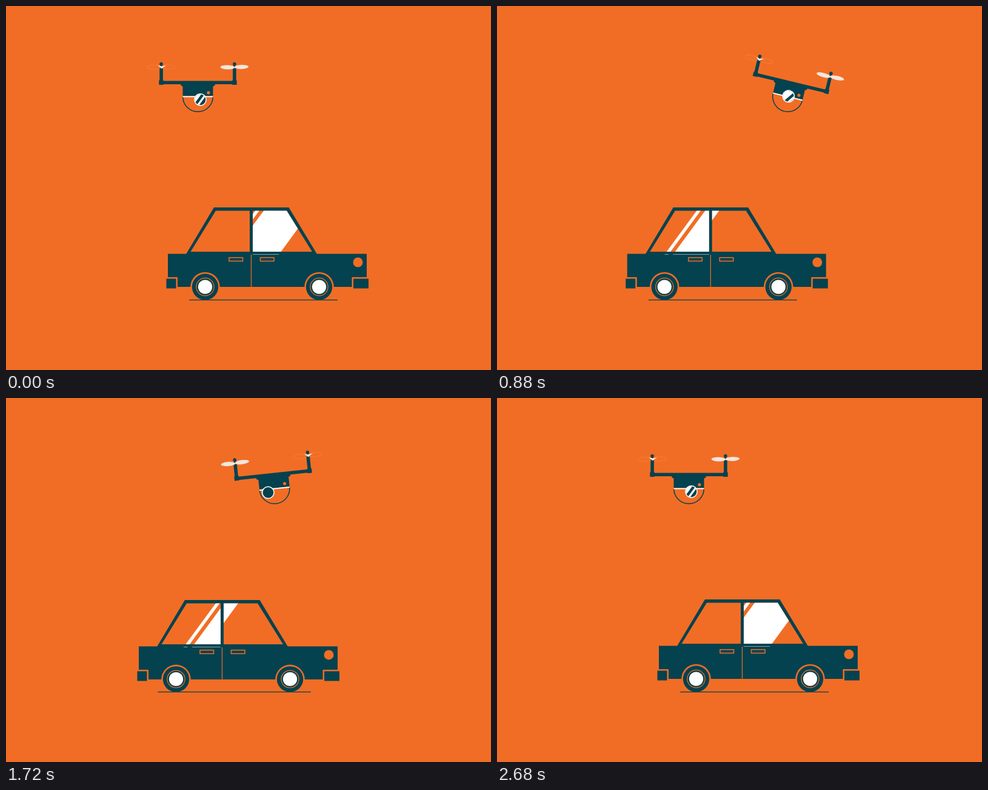
An HTML page with a canvas that plays this animation: 800x600 px, repeating every 2.72 s.

```html
<!DOCTYPE html>
<html>
<head>
<meta charset="utf-8">
<style>
html, body { margin: 0; height: 100%; overflow: hidden; background: #f16d25; }
canvas { display: block; }
</style>
</head>
<body>
<canvas id="stage" width="800" height="600"></canvas>
<script>
const ctx = document.getElementById('stage').getContext('2d');
const ORANGE = '#f16d25', DARK = '#04424f', WHITE = '#fff', BLADE = '#f1e6dd';
const LOOP = 2720, SPAN = 2680, STEP = 40, TAU = Math.PI * 2;

// Key poses: time, drone x, drone tilt in degrees, car x, lens x.
const POSES = [
  [0, 316.5, 0, 0, 4],
  [320, 308, -13.3, 4.5, 9.3],
  [640, 430.6, 22, -33, 2],
  [1120, 501, 0, -63, 0],
  [1720, 443, -6, -48, -11.2],
  [2320, 364.5, -5.2, -18.7, 3.8],
];

// Cubic through the poses, continuous across the loop.
function pose(t) {
  const n = POSES.length;
  const value = (i, c) => POSES[(i + n) % n][c] + (c ? 0 : Math.floor(i / n) * SPAN);
  const i = POSES.findLastIndex(p => p[0] <= t);
  const d = value(i + 1, 0) - value(i, 0), u = (t - value(i, 0)) / d;
  return [1, 2, 3, 4].map(c => {
    const slope = k => (value(k + 1, c) - value(k - 1, c)) / (value(k + 1, 0) - value(k - 1, 0));
    const a = value(i, c), b = value(i + 1, c);
    return a + (b - a) * u * u * (3 - 2 * u)
      + d * u * (1 - u) * (slope(i) * (1 - u) - slope(i + 1) * u);
  });
}

// One reflection slows down, rests and leaves; the next sweeps through evenly.
function windowShine(t) {
  if (t < 440) t += SPAN;
  if (t >= 2111) return 301 + .364 * (t - 2111);
  const left = Math.max(0, 1 - (t - 440) / 680);
  return 436 - 136 * left ** 2.3 + .6 * Math.max(0, t - 1720);
}

function rect(color, x0, y0, x1, y1) {
  ctx.fillStyle = color;
  ctx.fillRect(x0, y0, x1 - x0, y1 - y0);
}

function poly(color, ...p) {
  ctx.beginPath();
  for (let i = 0; i < p.length; i += 2) ctx.lineTo(p[i], p[i + 1]);
  ctx.closePath();
  ctx.fillStyle = color;
  ctx.fill();
}

function disc(color, x, y, r) {
  ctx.beginPath();
  ctx.arc(x, y, r, 0, TAU);
  ctx.fillStyle = color;
  ctx.fill();
}

function ring(width, color, x, y, r, end = TAU) {
  ctx.beginPath();
  ctx.arc(x, y, r, 0, end);
  ctx.strokeStyle = color;
  ctx.lineWidth = width;
  ctx.stroke();
}

function at(x, y, draw) {
  ctx.save();
  ctx.translate(x, y);
  draw();
  ctx.restore();
}

// A wide and a thin slanted band, which also graze the sill.
function drawWindow(edge, shape, sillStart, sillEnd) {
  ctx.save();
  poly(ORANGE, ...shape);
  ctx.rect(sillStart, 409.6, sillEnd - sillStart, .5);
  ctx.clip();
  for (const [a, b] of [[-78, 0], [-92, -85.5]]) {
    const l = edge + a, r = edge + b;
    poly(WHITE, l + 54, 332, r + 54, 332, r - 4, 411, l - 4, 411);
  }
  ctx.restore();
}

function drawCar(t, x) {
  const beat = t / SPAN * 12 % 1, shine = windowShine(t), wheels = [328.5, 516.5];
  const bounce = beat < .85 ? Math.sin(Math.PI * beat / .85) ** 2 : 0;

  at(x, 3.3 * bounce, () => {
    poly(DARK, 343, 332, 466.5, 332, 513, 409, 297, 409);
    rect(DARK, 267, 408.5, 595, 463);
    drawWindow(shine, [346, 337.5, 402, 337.5, 402, 405, 304.5, 405], 298, 402);
    drawWindow(shine - 55, [407, 337.5, 463, 337.5, 505, 405, 407, 405], 407, 512);
    rect(ORANGE, 403.9, 410, 405.1, 463);
    ctx.strokeStyle = ORANGE;
    ctx.lineWidth = 1.5;
    for (const h of [368, 419.5]) ctx.strokeRect(h, 414.7, 22.5, 5.8);
    disc(ORANGE, 580.5, 422.5, 8);
    rect(ORANGE, 263, 447, 283, 466);
    rect(DARK, 264.5, 449.5, 280.5, 465.5);
    rect(ORANGE, 570.5, 447, 599, 466);
    rect(DARK, 573, 449.5, 598, 465.5);
    for (const w of wheels) disc(ORANGE, w, 463, 24.3);
  });

  for (const w of wheels) at(x + w, 484.7, () => {
    ctx.scale(1, 1 - .07 * bounce);
    disc(DARK, 0, -21.7, 21.7);
    ring(1.2, ORANGE, 0, -21.7, 14.6);
    disc(WHITE, 0, -21.7, 11.6);
  });

  const half = 122.5 + 14 * bounce;
  rect(DARK, x + 424.5 - half, 483.9, x + 424.5 + half, 485.2);
}

function drawPropeller(x, open) {
  at(x, -48.8, () => {
    for (const side of [-1, 1]) {
      ctx.beginPath();
      ctx.ellipse(side * 11.5, -side * .3, 11.8, 3.5, -side * .03, 0, TAU);
      ctx.fillStyle = BLADE;
      ctx.strokeStyle = 'rgba(255,225,205,.2)';
      ctx.lineWidth = .6;
      if (open) ctx.fill();
      else ctx.stroke();
    }
    if (!open) poly(WHITE, -6, -2.5, 1, -1.2, 8, -2.5, 2, 1, 1, 2.6, -2, 0);
  });
}

// The reflection shifts with the direction the lens looks in.
function drawLens(t, x) {
  const y = 3.2 + 4.2 * Math.cos(TAU * (t / SPAN + .186));
  const edge = 1.7 * (x - y) - 2.5;
  at(x, y, () => {
    disc(WHITE, 0, 0, 10.4);
    disc(DARK, 0, 0, 8.9);
    ctx.clip();
    ctx.rotate(.63);
    rect(WHITE, -60, -12, edge, 12);
    rect(WHITE, edge + 4.5, -12, edge + 7.7, 12);
  });
}

function drawDrone(t, x, tilt, lensX) {
  const flip = t / STEP % 5 % 2 === 1;
  at(x, 149.5, () => {
    ctx.rotate(tilt * Math.PI / 180);
    ring(1.5, DARK, 0, 0, 24.8, Math.PI);
    rect(DARK, -63, -26, 63, -20.5);
    for (const [post, open] of [[-60.4, flip], [60.4, !flip]]) {
      rect(DARK, post - 2.8, -47, post + 2.8, -20);
      rect(DARK, post - 3.8, -27, post + 3.8, -19.7);
      rect(DARK, post - 1.5, -54, post + 1.5, -47);
      disc(DARK, post, -54, 2.8);
      drawPropeller(post, open);
    }
    poly(DARK, -29, -24, 29, -24, 28, -18.5, 25, -17, 25, -1, -25, -1, -25, -17, -28, -18.5);
    rect(WHITE, -25, -1, 25, .8);
    disc(ORANGE, 17.4, -6.6, 2.6);
    drawLens(t, lensX);
  });
}

function frame() {
  const t = Math.floor(performance.now() % LOOP / STEP) * STEP;
  const [droneX, tilt, carX, lensX] = pose(t);
  rect(ORANGE, 0, 0, 800, 600);
  drawCar(t, carX);
  drawDrone(t, droneX, tilt, lensX);
  requestAnimationFrame(frame);
}
frame();
</script>
</body>
</html>
```
